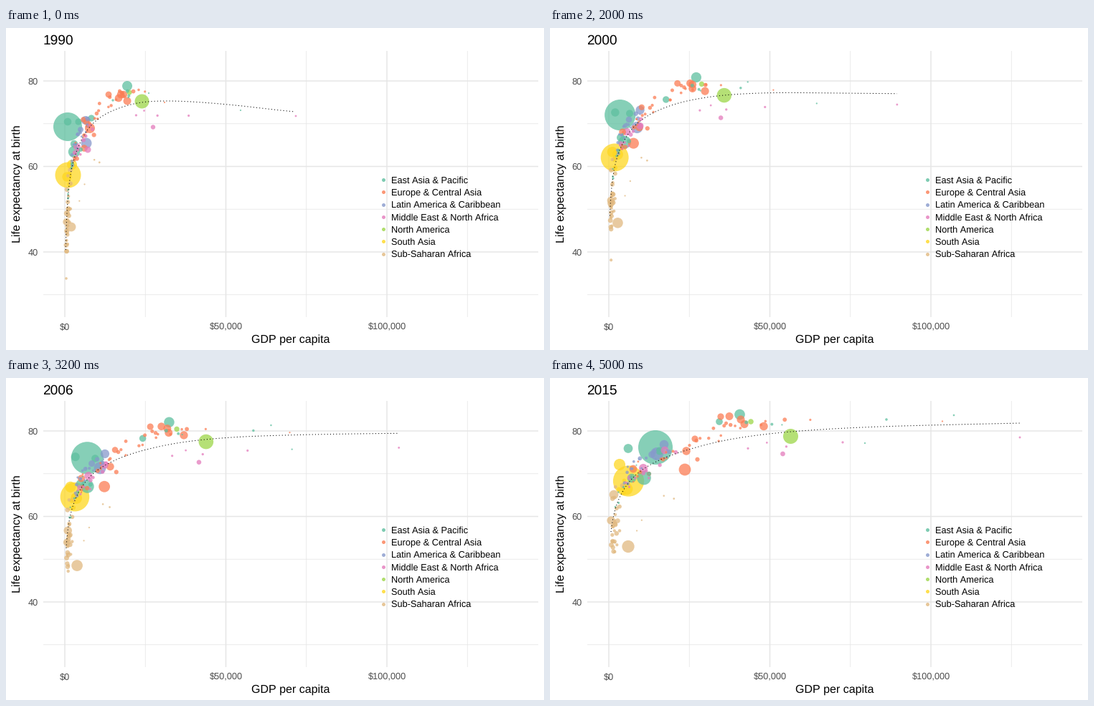
Animation, 750 px wide and 450 px high, one loop 8 s. Source, as a matplotlib script:

```python
import numpy as np
import matplotlib.pyplot as plt
from matplotlib.animation import FuncAnimation

W, H, DPI = 750, 450, 100
PT = 72 / DPI
X0 = 82                                  # position of $0
S = np.linspace(0, 1, 26)                # progress, one step per year
BUMP = np.sin(np.pi * S ** 0.7)          # setback of the 1990s
plt.rcParams["font.family"] = "Liberation Sans"
plt.rcParams["text.hinting"] = "none"
plt.rcParams["text.kerning_factor"] = 6

REGIONS = {
    "East Asia & Pacific": "#5ebf9f",
    "Europe & Central Asia": "#fb7d54",
    "Latin America & Caribbean": "#8799cc",
    "Middle East & North Africa": "#e47bbc",
    "North America": "#9cd648",
    "South Asia": "#fed722",
    "Sub-Saharan Africa": "#e1b980",
}
EAP, ECA, LAC, MEA, NAM, SAS, SSA = REGIONS.values()

# The trend runs through a few heights on a log axis and rises, easing out
KNOTS = np.log([1.2, 8, 18, 43, 68, 118, 168, 238, 321, 575])
FIRST = np.array([310, 205, 168, 130, 115, 102.8, 102.6, 108, 117, 131])
FINAL = np.array([240, 187, 161, 131, 116, 98, 86, 76.5, 70.5, 63])


def trend(off, s):
    """Height of the smooth curve at a distance from $0 (cubic Hermite)."""
    u = np.log(off)
    y = FIRST + (FINAL - FIRST) * (1 - (1 - s) ** 1.6)
    m = np.gradient(y, KNOTS)
    k = np.clip(np.searchsorted(KNOTS, u) - 1, 0, len(KNOTS) - 2)
    h = KNOTS[k + 1] - KNOTS[k]
    v = np.clip((u - KNOTS[k]) / h, 0, 1)
    a, b = y[k], y[k + 1]
    return (a + (b - a) * v * v * (3 - 2 * v)
            + h * v * (1 - v) * (m[k] * (1 - v) - m[k + 1] * v))


tracks = []                              # (color, radii, xs, ys)


def country(color, r, start, end, pace=1.1, lag=1, dip=(0, 0)):
    """One bubble moving from start to end; pace bends x, lag bends y."""
    x = start[0] + (end[0] - start[0]) * S ** pace + dip[0] * BUMP
    y = start[1] + (end[1] - start[1]) * S ** lag + dip[1] * BUMP
    grow = 1.05 if pace < 1.5 else 1.2
    if color == SSA:
        grow = 1.35
    tracks.append((color, r * np.linspace(1, grow, len(S)), x, y))


def group(color, count, radius, offsets, growth, drop, spread, pace=1.5):
    """Smaller countries that get richer while staying near the trend."""
    for _ in range(count):
        off = np.exp(rng.uniform(*np.log(offsets)))
        off = off * rng.uniform(*growth) ** (S ** pace)
        y = trend(off, 0) * 0 + [trend(o, s) for o, s in zip(off, S)]
        r = np.full(len(S), rng.uniform(*radius))
        tracks.append((color, r, X0 + off, y + rng.normal(drop, spread)))


# Rich countries grow steadily
country(NAM, 10, (189.5, 102.5), (335.5, 81.5))
country(NAM, 3.6, (172, 90), (280, 61))
country(EAP, 7, (169, 81), (264.5, 51))
country(EAP, 4.6, (119, 126), (236, 61))
country(ECA, 5.5, (169, 102), (298, 67.5))
country(ECA, 5.3, (160, 93), (266, 58))
country(ECA, 5.3, (157, 98), (271, 64.5))
country(ECA, 5.2, (164, 93), (250, 53.5))
country(ECA, 4.4, (143, 93), (238, 54))
country(ECA, 1.1, (221, 104), (547, 60.5), 1.4)
country(EAP, 1.7, (149, 101), (469, 58))
country(EAP, 1.1, (199, 91), (563, 52), 1.7)
country(EAP, 1.1, (327, 115), (439, 91), 1)
country(MEA, 1.4, (404, 123), (655, 83), 1.25)
country(MEA, 3.2, (205, 138.5), (324.5, 106), 1.4)

# Emerging countries speed up
country(EAP, 20, (86, 138), (147, 97), 1.8)
country(SAS, 18, (86.5, 205.5), (109.5, 144), 2)
country(EAP, 8.2, (95, 173), (131, 139.5), 1.5)
country(EAP, 5.2, (95, 162), (114, 140), 1.8)
country(EAP, 5.3, (86, 131), (109, 98.5), 1.7)
country(EAP, 4.6, (101, 131), (153, 102), 1.8)
country(SAS, 7, (92, 191), (107, 155), 2)
country(SAS, 6.7, (85, 208), (97, 121), 2)
country(LAC, 7.5, (112, 161), (149, 106), 1.5)
country(LAC, 6, (111, 129), (159, 93), 1.3)
country(LAC, 4, (104, 142), (142, 107), 2)
country(MEA, 4.5, (114, 170), (160, 101), 1.5, 0.8)
country(MEA, 5, (99, 166), (130, 126), 1.5, 0.7)
country(ECA, 4.8, (109, 168), (190, 102), 1.8, 0.9)
country(ECA, 3.8, (108, 128), (202, 85), 1.7)
country(ECA, 7, (117, 140), (188, 128), 2, 1, (-12, 26))
country(ECA, 4.5, (112, 131), (116, 127), 1.5, 1, (-12, 16))

# African life expectancy stalls before it rises
country(SSA, 6.4, (91, 278), (109, 235.5), 1.8, 2.2)
country(SSA, 4.7, (84, 271), (89, 163), 1.8, 1.4)
country(SSA, 4.2, (85, 259), (85, 199), 1.8, 1.6)
country(SSA, 1.8, (84, 350), (90, 167), 1.8, 1.3, (0, 30))

rng = np.random.default_rng(12)
group(ECA, 11, (1.6, 3), (60, 120), (2, 2.6), -17, 5, 1.1)
group(ECA, 16, (1.2, 3.2), (12, 55), (2, 3.4), -3, 9)
group(EAP, 3, (1, 3), (72, 95), (2, 2.8), -17, 3, 1.1)
group(EAP, 8, (1, 3.5), (4, 28), (2, 3.2), 2, 9)
group(LAC, 16, (1, 3.2), (10, 36), (2, 2.8), -7, 10)
group(MEA, 9, (1.2, 3.8), (12, 40), (1.7, 2.8), 0, 9)
group(MEA, 4, (1, 1.8), (95, 180), (1.6, 2), 18, 7, 1.1)
group(SAS, 3, (2.7, 3.3), (2.5, 8), (2.2, 3.5), -4, 10)
group(SSA, 28, (1.3, 3.5), (2, 9), (1.6, 2.6), 22, 22, 2)
group(SSA, 4, (1, 1.4), (20, 60), (1.5, 2.2), 75, 12, 2)

tracks.sort(key=lambda tr: -tr[1][0])
colors = [tr[0] for tr in tracks]
radii, xs, ys = (np.array([tr[i] for tr in tracks]) for i in (1, 2, 3))

fig = plt.figure(figsize=(W / DPI, H / DPI), dpi=DPI, facecolor="white")
ax = fig.add_axes([0, 0, 1, 1])
ax.set(xlim=(0, W), ylim=(H, 0))
ax.axis("off")


def label(x, y, text, px=12.8, color="black", **kw):
    return ax.text(x, y, text, fontsize=px * PT, color=color, **kw)


def bubbles(x, y, r, c, alpha, z):
    return ax.scatter(x, y, s=sizes(r), c=c, alpha=alpha, linewidths=0, zorder=z)


def sizes(r):
    return (2 * np.asarray(r) * PT) ** 2


def grid(x_step, y_step, px):
    """Three lines each way, beginning at the given positions."""
    style = dict(colors="#e6e6e6", linewidth=px * PT, zorder=1, snap=False)
    ax.vlines(x_step + 224.5 * np.arange(3), 32, 404, **style)
    ax.hlines(y_step + 119.5 * np.arange(3), 52, 742, **style)


grid(X0 + 112.25, 74 + 59.75, 0.8)
grid(X0, 74, 1.5)

for i in range(3):
    label(X0 + 224.5 * i, 421.7, f"${50000 * i:,}", color="#4d4d4d", ha="center")
    label(44.5, 78.8 + 119.5 * i, str(80 - 20 * i), color="#4d4d4d", ha="right")
label(396.8, 440, "GDP per capita", 16, ha="center")
label(19.5, 218, "Life expectancy at birth", 16, rotation=90,
      ha="center", va="baseline", rotation_mode="anchor")
title = label(51.5, 22.6, "", 19.2)

for i, (name, color) in enumerate(REGIONS.items()):
    y = 212 + 17.25 * i
    bubbles([526.3], [y], [2.5], [color], 0.8, 4)
    label(537, y + 4.8, name, zorder=4)

dots = bubbles(xs[:, 0], ys[:, 0], radii[:, 0], colors, 0.75, 2)
curve, = ax.plot([], [], color="black", linewidth=1.05 * PT,
                 linestyle=(0, (1, 3)), dash_capstyle="butt", zorder=3)


def draw(frame):
    t = min(frame, len(S) - 1)
    s = S[t]
    title.set_text(str(1990 + t))
    dots.set_offsets(np.column_stack([xs[:, t], ys[:, t]]))
    dots.set_sizes(sizes(radii[:, t]))
    off = np.geomspace(1.2 + 1.8 * s ** 2, 321 + 254 * s ** 1.25, 250)
    curve.set_data(X0 + off, trend(off, s))
    return dots, curve, title


# 26 years, then the last one holds
anim = FuncAnimation(fig, draw, frames=40, interval=200, repeat=True,
                     repeat_delay=0, blit=False)
plt.show()
```
